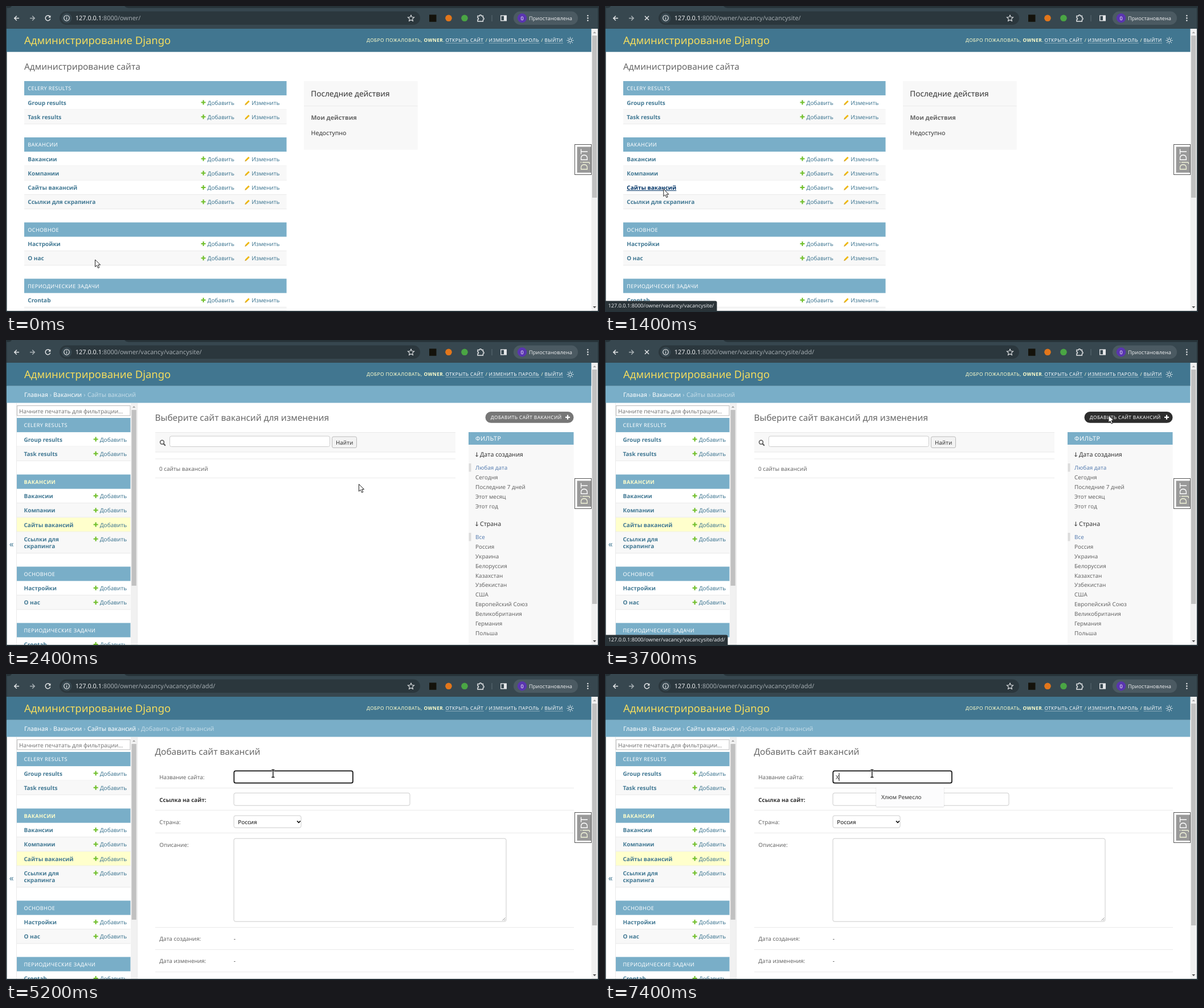
These frames come from a looping animation (1041x538 px, 8 s). An HTML page:

```html
<!DOCTYPE html>
<html lang="ru">
<head>
<meta charset="utf-8">
<title>Администрирование Django</title>
<style>
html, body { margin: 0; width: 100%; height: 100%; overflow: hidden; background: #263238; }
svg { display: block; width: 100%; height: 100%; }
text { font-family: "Noto Sans", sans-serif; font-size: 9.9px; fill: #666; text-rendering: geometricPrecision; white-space: pre; }
.b { font-weight: 700; }
.link, .hover { font-size: 10px; }
.link { fill: #417893; }
.hover { fill: #003366; text-decoration: underline; }
.cap { font-size: 9.14px; letter-spacing: .38px; fill: #fff; }
.tool { font-size: 8.38px; letter-spacing: .38px; fill: #fff; }
.h1 { font-size: 18.45px; fill: #f5dd5d; }
.h2 { font-size: 15.35px; }
.md { font-size: 10.67px; }
.dark { fill: #333; }
.white { fill: #fff; }
.pale { fill: #c4dce8; }
.cream { fill: #ffc; }
.url { font-size: 10.92px; fill: #a3abb0; }
.status { font-size: 9.14px; fill: #e3e5e8; }
.pick { fill: #5b80b2; }
</style>
</head>
<body>
<svg id="stage" viewBox="0 0 1041 538" preserveAspectRatio="none"></svg>
<script>
const LOOP = 8000;
const HOST = '127.0.0.1';
const BASE = ':8000/owner/';
const LIST = BASE + 'vacancy/vacancysite/';

const text = (x, y, s, cls = '', extra = '') => `<text x="${x}" y="${y}" class="${cls}" ${extra}>${s}</text>`;
const rect = (x, y, w, h, fill, extra = '') => `<rect x="${x}" y="${y}" width="${w}" height="${h}" fill="${fill}" ${extra}/>`;
const path = (d, stroke, width = 1, fill = 'none', extra = '') =>
  `<path d="${d}" fill="${fill}" stroke="${stroke}" stroke-width="${width}" ${extra}/>`;
const circle = (x, y, r, fill, extra = '') => `<circle cx="${x}" cy="${y}" r="${r}" fill="${fill}" ${extra}/>`;
const group = (id, body) => `<g id="${id}">${body}</g>`;
const hline = (x1, x2, y, color = '#eaeaea') => rect(x1, y, x2 - x1, 1, color);
const plus = (x, y, color = '#70bf2b') => path(`M${x - 4} ${y}h8M${x} ${y - 4}v8`, color, 2.2);
const field = (x, y, w, h) => rect(x + .5, y + .5, w - 1, h - 1, '#fff', 'stroke="#ccc" rx="3"');

const pencil = (x, y) =>
  path(`M${x - 2.6} ${y + 2.4}L${x + 3} ${y - 3}`, '#efb80b', 2.8) +
  path(`M${x - 4.4} ${y + 4.4}l.8-2.8 2 2z`, 'none', 0, '#c99a20');

const MODULES = [
  ['CELERY RESULTS', ['Group results', 'Task results']],
  ['ВАКАНСИИ', ['Вакансии', 'Компании', 'Сайты вакансий', 'Ссылки для скрапинга']],
  ['ОСНОВНОЕ', ['Настройки', 'О нас']],
  ['ПЕРИОДИЧЕСКИЕ ЗАДАЧИ', ['Crontab', 'Intervals']]
];

// One app table; the sidebar variant is narrower and wraps its longest link
function appTable([name, rows], top, x, w, side) {
  const tx = side ? x + 12.5 : x + 6.3;
  const current = side && name === 'ВАКАНСИИ';
  let out = rect(x, top, w, 25.3, '#79aec8') +
    text(tx, top + 16.2, name, current ? 'cap b cream' : 'cap');
  rows.forEach((label, i) => {
    const y = top + 25.3 + i * 25.25, mid = y + 12.7;
    const site = label === 'Сайты вакансий';
    const wrap = side && label.startsWith('Ссылки');
    const h = wrap ? 37.8 : 25.25;
    const fill = side && site ? '#ffc' : i % 2 ? '#f8f8f8' : '#fff';
    out += rect(x, y, w, h, fill) + hline(x, x + w, y + h - 1);
    const id = site ? `id="${side ? 'sideLink' : 'mainLink'}"` : '';
    if (wrap) out += text(tx, mid + 3.6, 'Ссылки для', 'b link') + text(tx, mid + 16.2, 'скрапинга', 'b link');
    else out += text(tx, mid + 3.6, label, 'b link', id);
    const ax = side ? 157.6 : 346.5;
    out += plus(ax, mid - .5) + text(ax + 7.1, mid + 3.6, 'Добавить', 'link');
    if (!side) out += pencil(423.7, mid) + text(431.3, mid + 3.6, 'Изменить', 'link');
  });
  return out;
}

const tables = (tops, x, w, side) => MODULES.map((m, i) => appTable(m, tops[i], x, w, side)).join('');

function scrollbar(end) {
  return rect(1027.5, 40, 11.5, 496, '#f1f1f1') + rect(1029, 52, 8.5, end - 52, '#c1c1c1') +
    path('M1030.5 48l2.7-3 2.7 3z', 'none', 0, '#a3a3a3') + path('M1030.3 528l2.9 3.2 2.9-3.2z', 'none', 0, '#505050');
}

function indexPage() {
  return tables([132, 231, 380.5, 479.5], 32, 460.5, false) +
    text(32, 112, 'Администрирование сайта', 'h2') +
    rect(523, 132, 199.7, 120.7, '#f8f8f8') + hline(523, 722.7, 175.3) +
    text(535.3, 158.8, 'Последние действия', 'dark', 'style="font-size:13.6px"') +
    text(535.5, 199.5, 'Мои действия', 'b md') +
    text(535.5, 226.8, 'Недоступно', 'md dark') + scrollbar(337);
}

function sidebar() {
  return rect(18, 111, 1, 425, '#eaeaea') + text(5.8, 364, '«', 'link', 'style="font-size:15.2px"') +
    rect(19.5, 115.5, 198.5, 17.5, '#fff', 'stroke="#bbb"') +
    text(23, 128.6, 'Начните печатать для фильтрации...', '', 'style="font-size:10.1px;fill:#757575"') +
    tables([137, 236.5, 398.5, 497.5], 19, 199.5, true) +
    rect(219, 111, 11, 425, '#f1f1f1') + rect(220.5, 123, 8.3, 309, '#c1c1c1') +
    path('M222 119l2.6-3 2.6 3z', 'none', 0, '#a3a3a3') + rect(230, 111, 1, 425, '#eaeaea');
}

const crumb = (x, s, last) => text(x, 99.7, s, last ? 'md pale' : 'md white');
const arrow = x => text(x, 99.7, '›', 'md pale');

function filterGroup(title, y, options) {
  return path(`M826.5 ${y - 7.5}v7.5M824.3 ${y - 2.3}l2.2 2.4 2.2-2.4`, '#333', 1) +
    text(832, y, title, 'md dark') + rect(812.5, y + 12, 4, 14.5, '#dcdcdc') +
    options.map((o, i) => text(824, y + 23 + i * 16.88, o, i ? '' : 'pick')).join('');
}

function listPage() {
  return text(261.5, 142, 'Выберите сайт вакансий для изменения', 'h2') +
    rect(841.5, 126, 155, 19.8, '#777', 'rx="9.9" id="addButton"') +
    text(850.8, 139, 'ДОБАВИТЬ САЙТ ВАКАНСИЙ', 'tool') + plus(986, 135.8, '#fff') +
    rect(262, 162, 527, 35, '#f8f8f8') + hline(262, 789, 162) + hline(262, 789, 196.5) +
    circle(274, 179.7, 3.4, 'none', 'stroke="#555" stroke-width="1.5"') + path('M276.5 182.3l3.3 3.5', '#555', 2) +
    field(287, 168.5, 282, 19.5) +
    rect(572.5, 170, 43, 19.5, '#f3f3f3', 'stroke="#bbb" rx="2.5"') + text(579, 183.6, 'Найти', 'dark') +
    hline(262, 789, 208.5) + hline(262, 789, 242) + text(269, 229.6, '0 сайты вакансий') +
    rect(812, 162, 184.5, 22.3, '#79aec8') + rect(812, 184.3, 184.5, 352, '#f8f8f8') +
    text(824, 177, 'ФИЛЬТР', 'md white', 'letter-spacing=".38"') +
    filterGroup('Дата создания', 205, ['Любая дата', 'Сегодня', 'Последние 7 дней', 'Этот месяц', 'Этот год']) +
    filterGroup('Страна', 327, ['Все', 'Россия', 'Украина', 'Белоруссия', 'Казахстан', 'Узбекистан', 'США',
      'Европейский Союз', 'Великобритания', 'Германия', 'Польша']) + scrollbar(464);
}

function addPage() {
  const labels = [[185, 'Название сайта:'], [224.5, 'Ссылка на сайт:'], [263.5, 'Страна:'], [304, 'Описание:'],
    [469, 'Дата создания:'], [508.3, 'Дата изменения:']];
  return text(261.5, 142, 'Добавить сайт вакансий', 'h2') +
    labels.map(([y, s], i) => text(269.3, y, s, i === 1 ? 'b dark' : '')).join('') +
    [200, 239, 279, 445, 484, 523.3].map(y => hline(262, 997, y)).join('') +
    rect(400.3, 170.3, 208.6, 21.4, '#fff', 'stroke="#101010" stroke-width="1.7" rx="3"') +
    field(399.5, 208.7, 310, 23) + field(399.5, 248.5, 119, 22.3) +
    text(407.2, 263.9, 'Россия', '', 'style="fill:#111"') + path('M511 258.4l2.9 3 2.9-3', '#111', 1.6) +
    field(399.5, 288.7, 479, 147) + path('M871.5 433.5l5-5M874.5 433.5l2-2', '#777', .8) +
    text(399.7, 469, '-', 'dark') + text(399.7, 508.3, '-', 'dark') + scrollbar(442);
}

function header() {
  const bar = (x1, x2) => hline(x1, x2, 64.8, '#8aabba');
  return rect(1, 40, 1026.5, 40.7, '#417690') + text(32, 67.3, 'Администрирование Django', 'h1') +
    group('tools', text(633, 63.2, 'ДОБРО ПОЖАЛОВАТЬ,', 'tool cream') + text(733.6, 63.2, 'OWNER', 'tool cream b') +
      text(767.3, 63.2, '.', 'tool cream') + text(771.5, 63.2, 'ОТКРЫТЬ САЙТ', 'tool') + text(841.8, 63.2, '/', 'tool cream') +
      text(847.6, 63.2, 'ИЗМЕНИТЬ ПАРОЛЬ', 'tool') + text(939.5, 63.2, '/', 'tool cream') + text(945.5, 63.2, 'ВЫЙТИ', 'tool') +
      bar(771.5, 839) + bar(847.6, 937) + bar(945.5, 978)) +
    group('sun', circle(990.5, 60.5, 2.7, 'none', 'stroke="#fff"') +
      [0, 45, 90, 135, 180, 225, 270, 315].map(a =>
        path('M990.5 56.2v-1.6', '#fff', 1.1, 'none', `transform="rotate(${a} 990.5 60.5)"`)).join(''));
}

function browser() {
  const ink = '#e4e6e8', bar = '#37474f', well = '#2b373d';
  return rect(0, 0, 1041, 538, '#263238') +
    path('M0 3.5H5Q9 3 10 0H208Q210 3 215 3.5H1039V40H1.5V3.5z', 'none', 0, bar) +
    rect(94, 9.5, 633, 23.5, well, 'rx="11.7"') + circle(106.5, 21.3, 9, bar) +
    path('M23 21.5h-8M18.8 17.5l-4 4 4 4', ink, 1.5) + path('M42 21.5h8M46.2 17.5l4 4-4 4', '#a9b1b5', 1.5) +
    group('reload', path('M77.2 18.7A4.4 4.4 0 1 0 77.8 22.6', ink, 1.5) + path('M78.4 16.3v4.2h-4.2z', 'none', 0, ink)) +
    group('stop', path('M70 17.8l7 7M77 17.8l-7 7', ink, 1.5)) +
    circle(106.5, 21.3, 4.8, 'none', `stroke="${ink}" stroke-width="1.2"`) + path('M106.5 20.7v3.3M106.5 18.5v1.3', ink, 1.2) +
    `<text x="121.8" y="25.3" class="url"><tspan fill="#eef0f2">${HOST}</tspan><tspan id="path"></tspan></text>` +
    path('M711 16l1.6 3.6 3.9.4-2.9 2.6.8 3.9-3.4-2-3.4 2 .8-3.9-2.9-2.6 3.9-.4z', ink, 1.1) +
    rect(743, 15.3, 12.5, 12.5, '#14120b') + circle(777, 21.3, 5.8, '#e2761b') + circle(805, 21.3, 5.8, '#4aa544') +
    path('M828 17.5h3.2a1.7 1.7 0 0 1 3.4 0h2.8v3.3a1.7 1.7 0 0 1 0 3.4v2.8h-9.4v-3a1.6 1.6 0 0 0 0-3.2z', ink, 1.4) +
    rect(852.5, 16, 1, 11, '#5d6c74') +
    rect(868.7, 17, 9.6, 8.8, 'none', `stroke="${ink}" stroke-width="1.4"`) + rect(874, 17, 4.4, 8.8, ink) +
    rect(891, 9.5, 113, 23.5, '#4b5a62', 'rx="11.7"') + circle(906, 21.3, 8.2, '#5a35b0') +
    text(906, 24.6, '0', 'white', 'text-anchor="middle" style="font-size:9px"') +
    text(918, 24.7, 'Приостановлена', '', 'style="font-size:9.2px;fill:#e4e6e8"') +
    [17, 21.3, 25.6].map(y => circle(1021.3, y, 1.25, ink)).join('') +
    rect(1.5, 40, 1037.5, 496, '#fff');
}

const toolbarHandle = rect(998.5, 243.5, 29, 53, '#fff', 'stroke="#555"') + rect(1002.5, 247.5, 24.5, 45.5, '#999') +
  '<text transform="translate(1021.3 289.5) rotate(-90)" class="white" style="font-size:17px">' +
  '<tspan fill="#f0f3d8">Dj</tspan>DT</text>';

const popup = rect(475.5, 198.5, 120, 36, '#000', 'rx="2" opacity=".13"') + rect(476, 198, 119, 35.5, '#fcfcfd', 'rx="1"') +
  text(485, 219.6, 'Хлюм Ремесло', 'dark');

const stage = document.getElementById('stage');
stage.innerHTML = '<clipPath id="view"><rect x="1" y="40" width="1038" height="496"/></clipPath>' + browser() +
  '<g clip-path="url(#view)">' + group('index', indexPage()) +
  group('inner', rect(1, 80.5, 1026.5, 30, '#79aec8') + crumb(32, 'Главная') + arrow(76.8) + crumb(83, 'Вакансии') + arrow(136.3) + sidebar()) +
  group('list', crumb(143, 'Сайты вакансий', true) + listPage()) +
  group('add', crumb(143, 'Сайты вакансий') + arrow(231) + crumb(237, 'Добавить сайт вакансий', true) + addPage()) +
  header() + group('handle', toolbarHandle) +
  group('typed', text(405, 184.8, 'Х', 'dark')) + rect(405, 174, 1, 14, '#111', 'id="caret"') + group('popup', popup) +
  group('status', path('', 'none', 0, '#2a3338', 'id="bubble"') + text(5.6, 530.4, '', 'status', 'id="statusText"')) + '</g>' +
  group('pointer', path('M0 0V12.6l2.9-2.7 2.2 4.8 2.2-1-2.2-4.6h4z', '#222', 1, '#fff', 'stroke-linejoin="round"')) +
  group('beam', path('M-2.8 .5H2.8M0 .5V13.5M-2.8 13.5H2.8', '#fff', 2.8) + path('M-2.6 .5H2.6M0 .5V13.5M-2.6 13.5H2.6', '#111', 1.4));

const el = {};
stage.querySelectorAll('[id]').forEach(n => el[n.id] = n);
const show = (id, on) => el[id].style.display = on ? '' : 'none';
const within = (t, a, b) => t >= a && t < b;

const TRACK = [[0, 156.5, 446], [900, 102.8, 322], [2100, 102.8, 322], [2200, 110, 321], [2400, 619.5, 253.5],
  [3000, 619.5, 253.5], [3300, 905, 129], [3400, 905, 129], [3500, 884, 132.5], [3900, 884, 132.5],
  [4100, 684, 144], [4200, 684, 144], [4300, 488, 156.5], [LOOP, 488, 156.5]];

function pointerAt(t) {
  const i = TRACK.findIndex(k => k[0] > t);
  const [t0, x0, y0] = TRACK[i - 1], [t1, x1, y1] = TRACK[i];
  const u = (t - t0) / (t1 - t0);
  return [x0 + (x1 - x0) * u, y0 + (y1 - y0) * u];
}

function draw(time) {
  const t = Math.floor(time % LOOP / 100) * 100;
  const index = t < 1600, add = t >= 4000;
  show('index', index);
  show('inner', !index);
  show('list', !index && !add);
  show('add', add);

  const ready = !within(t, 1600, 1700) && !within(t, 4000, 4100);
  show('sun', ready);
  show('handle', ready);
  el.tools.setAttribute('transform', `translate(${ready ? 0 : 12.5} 0)`);

  const loading = within(t, 1200, 1800) || within(t, 3500, 4100);
  show('stop', loading);
  show('reload', !loading);
  el.path.textContent = t < 1300 ? BASE : t < 3700 ? LIST : LIST + 'add/';

  const toAdd = t >= 3300;
  show('status', within(t, 900, 1900) || within(t, 3300, 4100));
  el.status.setAttribute('opacity', t === 900 ? .6 : 1);
  el.statusText.textContent = HOST + LIST + (toAdd ? 'add/' : '');
  const w = toAdd ? 215.5 : 196.5;
  el.bubble.setAttribute('d', `M1 518.5H${w - 3}Q${w} 518.5 ${w} 521.5V536H1z`);

  el.mainLink.setAttribute('class', t >= 900 ? 'b hover' : 'b link');
  el.sideLink.setAttribute('class', t === 2200 ? 'b hover' : 'b link');
  el.addButton.setAttribute('fill', toAdd ? '#2d2d2d' : '#777');

  const typed = t >= 7400;
  show('typed', typed);
  show('popup', typed);
  show('caret', typed || within(t, 4100, 4600) || within(t, 5500, 5900) || within(t, 6500, 7100));
  el.caret.setAttribute('x', typed ? 410.5 : 405);

  const [x, y] = pointerAt(t);
  show('pointer', t < 4500);
  show('beam', t >= 4500);
  el.pointer.setAttribute('transform', `translate(${x} ${y})`);
  el.beam.setAttribute('transform', `translate(468.8 ${t < 5200 ? 170 : 168})`);
}

const start = performance.now();
function tick() {
  draw(performance.now() - start);
  requestAnimationFrame(tick);
}
tick();
</script>
</body>
</html>
```
